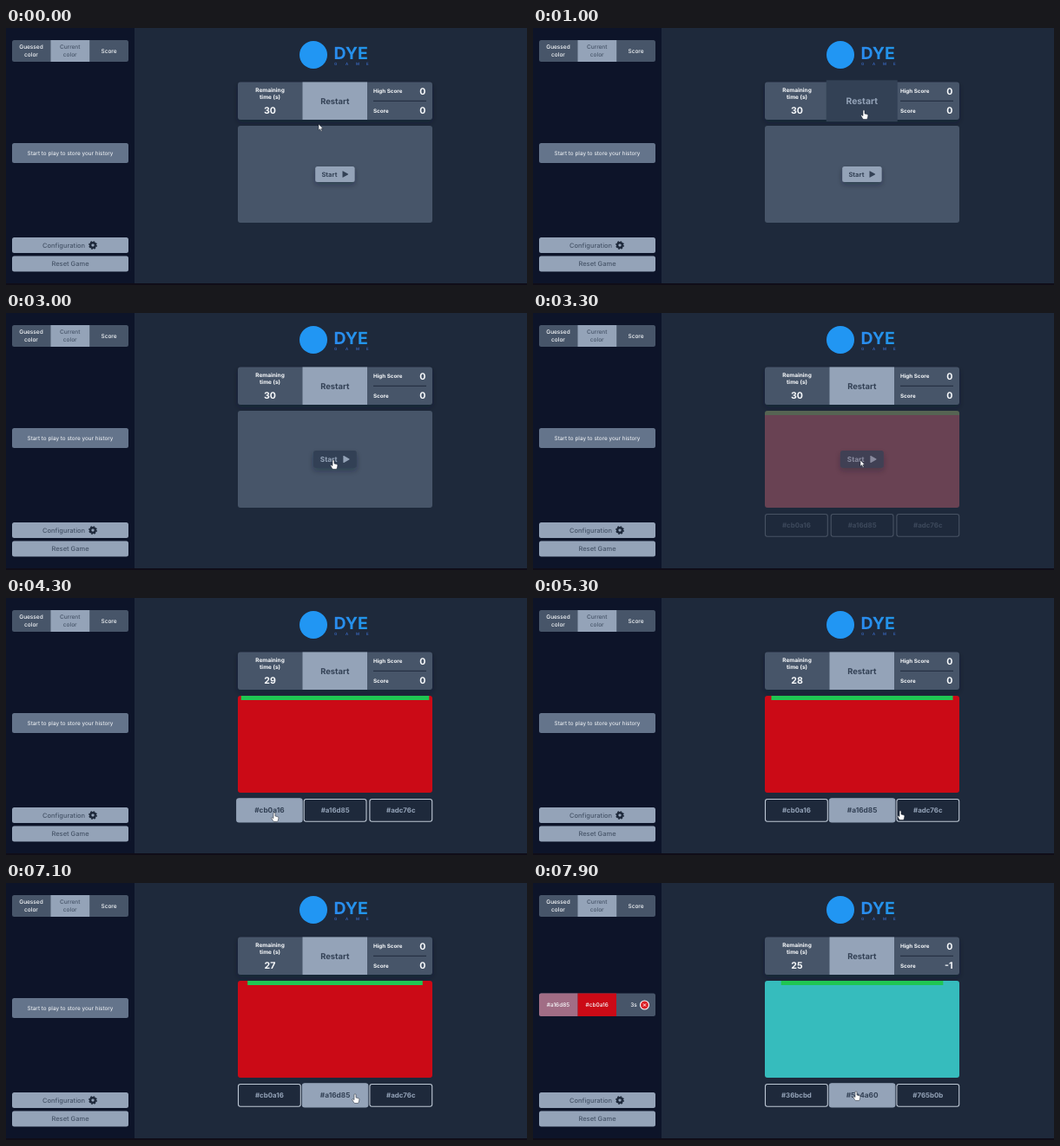
An HTML page that plays this animation: 600x297 px, repeating every 8000 ms.

```html
<!DOCTYPE html>
<html lang="en">
<head>
<meta charset="utf-8">
<title>Color guessing game</title>
<style>
  html, body { margin: 0; width: 100%; height: 100%; overflow: hidden; background: #1e293b; }
  svg { display: block; width: 100vw; height: 100vh; }
  text { font-family: Inter, "Open Sans", sans-serif; font-weight: 500; font-size: 6.5px; fill: #f8fafc; text-rendering: geometricPrecision; }
  .mid { text-anchor: middle; }
  .end { text-anchor: end; }
  .bold { font-weight: 700; }
  .num { font-size: 10.6px; font-weight: 700; }
  .dark { fill: #475569; }
  .side { font-size: 7.5px; fill: #475569; }
  .slate { fill: #475569; }
  .light { fill: #94a3b8; }
</style>
</head>
<body>
<svg viewBox="0 0 600 297" preserveAspectRatio="none">
  <defs>
    <linearGradient id="blue" x1="0" x2="1" y1="0" y2="0">
      <stop offset="0" stop-color="#2b8cf0"/><stop offset="1" stop-color="#2196e8"/>
    </linearGradient>
    <filter id="shade" x="-20%" y="-40%" width="140%" height="200%">
      <feDropShadow dx="0" dy="3" stdDeviation="3" flood-color="#0f172a" flood-opacity=".35"/>
    </filter>
    <clipPath id="head"><rect x="7" y="14" width="134" height="25" rx="2.5"/></clipPath>
    <clipPath id="line"><rect x="7" y="127.5" width="134" height="26.5" rx="2.5"/></clipPath>
    <clipPath id="frame"><rect x="267" y="113" width="224" height="112" rx="3"/></clipPath>
  </defs>

  <rect width="600" height="297" fill="#1e293b"/>
  <rect width="148" height="297" fill="#0d1429"/>

  <!-- sidebar -->
  <g clip-path="url(#head)">
    <rect class="slate" x="7" y="14" width="134" height="25"/>
    <rect class="light" x="51.5" y="14" width="44.7" height="25"/>
  </g>
  <g class="mid">
    <text x="29" y="24.4">Guessed</text><text x="29" y="33">color</text>
    <text class="dark" x="73.7" y="24.4">Current</text><text class="dark" x="73.7" y="33">color</text>
    <text x="118.5" y="29">Score</text>
  </g>
  <g id="hint">
    <rect x="7" y="133" width="134" height="23" rx="2.5" fill="#64748b"/>
    <text class="mid" x="74" y="146.9" style="font-weight:400;font-size:6.4px">Start to play to store your history</text>
  </g>
  <g id="entry">
    <g clip-path="url(#line)">
      <rect class="slate" x="7" y="127" width="134" height="28"/>
      <rect x="7" y="127" width="44.5" height="28" fill="#a16d85"/>
      <rect x="51.5" y="127" width="44.5" height="28" fill="#cb0a16"/>
    </g>
    <text class="mid" x="29" y="143.2">#a16d85</text>
    <text class="mid" x="73.7" y="143.2">#cb0a16</text>
    <text class="mid" x="116" y="143.2">3s</text>
    <circle cx="128.5" cy="141" r="5" fill="#dc1f26" stroke="#fff" stroke-width="1.1"/>
    <path d="M127 139.500l3 3m0-3l-3 3" stroke="#fff" stroke-width=".9"/>
  </g>
  <rect class="light" x="7" y="242" width="134" height="18" rx="2.5"/>
  <text class="side" x="42" y="253.7">Configuration</text>
  <g fill="none" stroke="#1e293b" transform="translate(100 251)">
    <circle r="2.8" stroke-width="2.4"/>
    <circle r="4.2" stroke-width="1.4" stroke-dasharray="1.75 1.55"/>
  </g>
  <rect class="light" x="7" y="263.500" width="134" height="18" rx="2.5"/>
  <text class="side mid" x="74" y="275.2">Reset Game</text>

  <!-- title -->
  <circle cx="354" cy="31" r="16" fill="#2196f3"/>
  <text x="377.500" y="35.500" style="font-size:19.5px;font-weight:700;fill:url(#blue)">DYE</text>
  <text x="378 391 403 415" y="43" style="font-size:4.4px;fill:#3d6fd0">GAME</text>

  <!-- score board -->
  <rect class="slate" x="267" y="62.5" width="224" height="43.5" rx="3" filter="url(#shade)"/>
  <g class="mid">
    <text class="bold" x="304" y="73.500">Remaining</text>
    <text class="bold" x="304" y="82">time (s)</text>
    <text class="num" id="clock" x="304" y="98.6">30</text>
  </g>
  <text class="bold" x="423" y="75.3" style="font-size:6.25px">High Score</text>
  <text class="bold" x="423" y="97.7" style="font-size:6.25px">Score</text>
  <text class="num end" x="483.5" y="76.900">0</text>
  <text class="num end" id="score" x="483.5" y="99.2">0</text>
  <path d="M423 84.300h61" stroke="#1e293b"/>
  <g id="restart">
    <rect x="341.5" y="62.5" width="74.5" height="43.500"/>
    <text class="mid bold" x="378.8" y="87.600" style="font-size:9.4px">Restart</text>
  </g>

  <!-- game area -->
  <rect id="panel" x="267" y="113" width="224" height="112" rx="3"/>
  <g clip-path="url(#frame)"><rect id="bar" y="113" height="5" fill="#20c653"/></g>
  <g id="start">
    <rect x="356.2" y="160" width="45.4" height="18" rx="2.5" filter="url(#shade)"/>
    <text class="bold" x="363.4" y="171.600" style="font-size:7.500px">Start</text>
    <path d="M387.500 165.800q0-.8.8-.4l5.500 3.200q.6.4 0 .8l-5.500 3.200q-.8.4-.8-.4z"/>
  </g>
  <g id="choices"></g>

  <rect y="295" width="600" height="2" fill="#100d18"/>
  <g id="cursor" fill="#fff" stroke="#111827" stroke-width=".5" stroke-linejoin="round">
    <path id="arrow" d="M0 0V7.200L1.700 5.700L2.900 8.400L4.100 7.900L2.900 5.300H5.100Z"/>
    <path id="hand" d="M-1 .8a1 1 0 0 1 2 0V4l3 .8q1 .3.9 1.400l-.6 3q-.3 1.300-1.400 1.300H0q-.8 0-1.300-.8L-3.200 6.600q-.3-1 .6-1l1.600 1z"/>
  </g>
</svg>
<script>
const LOOP = 8000, STEP = 100, FADE = 300;
const BEGIN = 3200, GUESS = 7300;
const $ = id => document.getElementById(id);
const SLATE = [71, 85, 105], LIGHT = [148, 163, 184], DARK = [51, 65, 85];
const NIGHT = [30, 41, 59], RED = [203, 10, 22], TEAL = [54, 188, 189];
const ROUNDS = [['#cb0a16', '#a16d85', '#adc76c'], ['#36bcbd', '#5e4a60', '#765b0b']];

// time, x, y of the pointer tip
const PATH = [
  [100, 360, 111], [800, 381, 95], [1900, 381, 95], [2600, 377, 170], [3500, 377, 170],
  [4200, 309, 248], [4700, 309, 248], [5300, 423, 246], [5600, 436, 247], [6200, 436, 247],
  [6800, 402, 244], [7100, 402, 244], [7900, 372, 241]
];
// hover intervals
const HOVER = {
  restart: [[250, 2100]],
  start: [[2400, BEGIN + FADE]],
  choices: [[[3960, 4900]], [[4900, 5300], [6500, 9000]], [[5300, 6500]]]
};
const TICKS = [4200, 5200, 6300, GUESS, 7800];

const clamp = v => Math.max(0, Math.min(1, v));
const smooth = u => u * u * (3 - 2 * u);
const ramp = (t, from, dur = FADE) => smooth(clamp((t - from) / dur));
const hover = (t, spans) => Math.max(...spans.map(([on, off]) => ramp(t, on) * (1 - ramp(t, off))));
const mix = (a, b, k) => `rgb(${a.map((v, i) => Math.round(v + (b[i] - v) * k))})`;
const inside = (t, [on, off]) => t >= on && t < off;

function scale(el, cx, cy, s) {
  el.setAttribute('transform', `translate(${cx} ${cy}) scale(${s}) translate(${-cx} ${-cy})`);
}

function paint(el, cx, cy, k) {
  scale(el, cx, cy, 1 + .1 * k);
  [...el.children].forEach((part, i) => {
    part.style.fill = i ? mix(DARK, LIGHT, k) : mix(LIGHT, DARK, k);
  });
}

$('choices').innerHTML = [0, 1, 2].map(i => {
  const x = 267.5 + 75.7 * i;
  return `<g><rect x="${x}" y="232.5" width="71.8" height="25.8" rx="2.5" stroke-width="1.1"/>
    <text class="mid bold" x="${x + 35.9}" y="248.1" style="font-size:7.9px"></text></g>`;
}).join('');
const choices = [...$('choices').children];

function pointer(t) {
  let i = 0;
  while (i < PATH.length - 2 && t > PATH[i + 1][0]) i++;
  const [t0, x0, y0] = PATH[i], [t1, x1, y1] = PATH[i + 1];
  const k = ramp(t, t0, t1 - t0);
  return [x0 + (x1 - x0) * k, y0 + (y1 - y0) * k];
}

function draw(t) {
  const live = ramp(t, BEGIN), done = t >= GUESS;
  const left = 30 - TICKS.filter(at => t >= at).length;

  $('clock').textContent = left;
  $('score').textContent = done ? '-1' : '0';
  $('hint').style.display = done ? 'none' : '';
  $('entry').style.display = done ? '' : 'none';

  paint($('restart'), 378.8, 84.3, hover(t, HOVER.restart));
  paint($('start'), 378.9, 169, hover(t, HOVER.start));
  $('start').style.opacity = 1 - live;

  $('panel').style.fill = done ? mix(RED, TEAL, ramp(t, GUESS - 100)) : mix(SLATE, RED, live);
  const width = 224 * left / 30;
  $('bar').setAttribute('x', 379 - width / 2);
  $('bar').setAttribute('width', width);
  $('bar').style.opacity = live;

  $('choices').style.opacity = live;
  choices.forEach((el, i) => {
    const k = hover(t, HOVER.choices[i]), [box, label] = el.children;
    scale(el, 303.4 + 75.7 * i, 245.4, 1 + .05 * k);
    box.style.fill = mix(NIGHT, LIGHT, k);
    box.style.stroke = mix([190, 200, 213], LIGHT, k);
    label.style.fill = mix(LIGHT, DARK, k);
    label.textContent = ROUNDS[+done][i];
  });

  const [x, y] = pointer(t);
  const hand = [[250, 2100], [2400, BEGIN], [3960, LOOP]].some(span => inside(t, span));
  $('cursor').setAttribute('transform', `translate(${x} ${y})`);
  $('hand').style.display = hand ? '' : 'none';
  $('arrow').style.display = hand ? 'none' : '';
}

function tick() {
  draw(Math.floor(performance.now() % LOOP / STEP) * STEP);
  requestAnimationFrame(tick);
}
tick();
</script>
</body>
</html>
```
